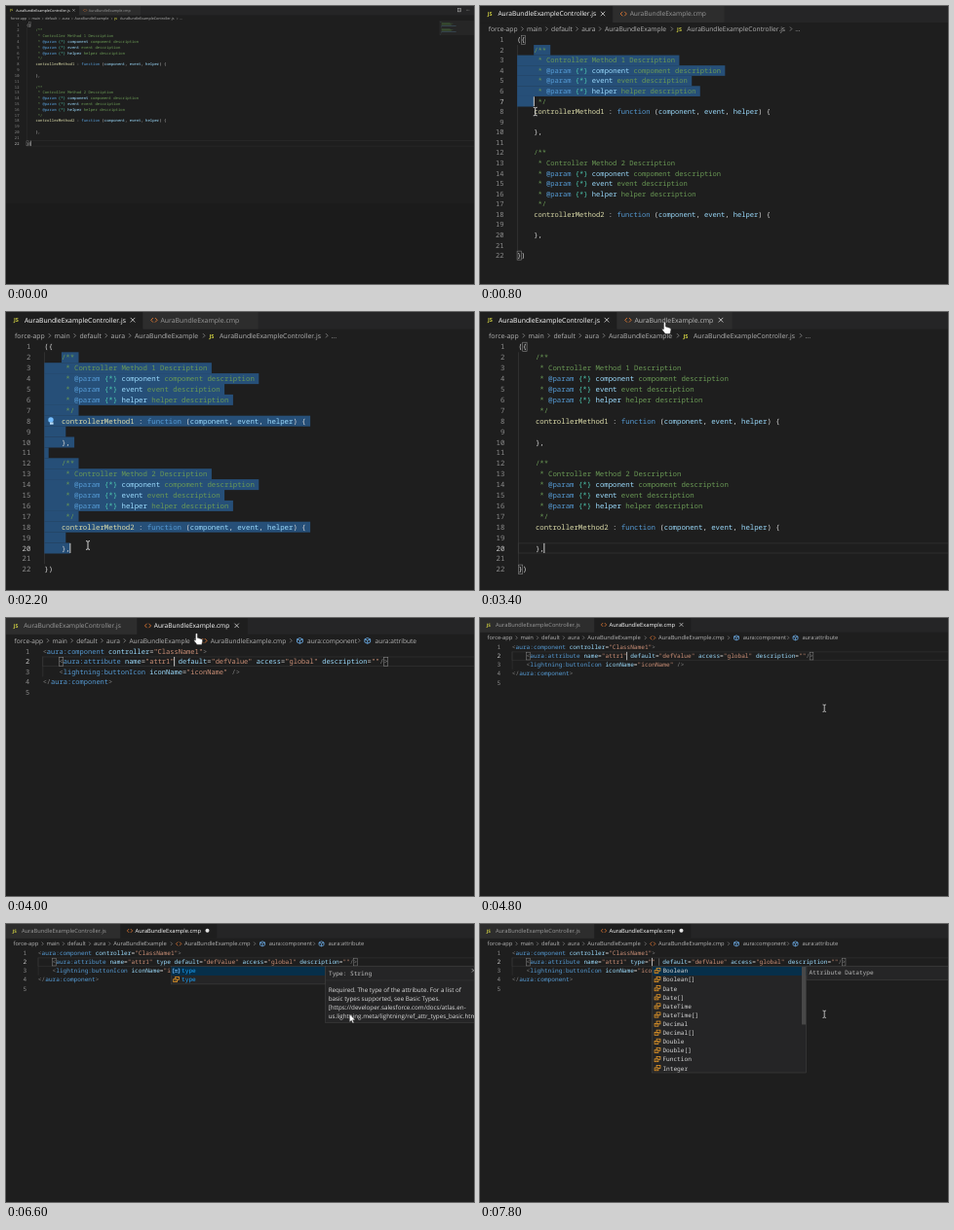
These frames come from a looping animation (480x286 px, 8 s). An HTML page:

```html
<!DOCTYPE html>
<html lang="en">
<head>
<meta charset="utf-8">
<title>Editor snippets</title>
<style>
html, body { margin: 0; width: 100%; height: 100%; overflow: hidden; background: #1e1e1e; }
svg { display: block; width: 100%; height: 100%; }
text { white-space: pre; text-rendering: geometricPrecision; font-weight: 500; }
.code { font-family: "Noto Sans Mono", "DejaVu Sans Mono", monospace; font-size: 7.333px; }
.ui, .doc { font-family: "Open Sans", "Noto Sans", sans-serif; font-size: 6.87px; }
.doc { font-size: 7.5px; }
</style>
</head>
<body>
<svg id="stage" viewBox="0 0 480 286"><g id="world"></g></svg>
<script>
const LOOP = 8000, STEP = 200;
const CH = 4.4, ROW = 10.9, LEFT = 39.3, TOP = 30.4;
const C = {
  text: '#d4d4d4', dim: '#8c8c8c', comment: '#6a9955', blue: '#569cd6', teal: '#4ec9b0',
  light: '#9cdcfe', fn: '#dcdcaa', str: '#ce9178', js: '#cbcb41', cmp: '#e37933',
  item: '#75beff', value: '#ee9d28', hit: '#18a3ff', crumb: '#b4b4b4'
};

const method = n => [
  '    /**',
  `     * Controller Method ${n} Description`,
  '     * @param {*} component compoment description',
  '     * @param {*} event event description',
  '     * @param {*} helper helper description',
  '     */',
  `    controllerMethod${n} : function (component, event, helper) {`,
  '    ',
  '    },'
];
const jsLines = ['({', ...method(1), '', ...method(2), '', '})'];
const head = '    <aura:attribute name="attr1"';
const tail = ' default="defValue" access="global" description=""/>';
const types = ['Boolean', 'Boolean[]', 'Date', 'Date[]', 'DateTime', 'DateTime[]',
  'Decimal', 'Decimal[]', 'Double', 'Double[]', 'Function', 'Integer'];

// Times with values; the last one reached holds.
const selection = [[600, [4, 4]], [800, [7, 4]], [1000, [8, 4]], [1400, [9, 4]],
  [1600, [12, 7]], [1800, [16, 20]], [2000, [20, 6]], [2600, null]];
const typing = [[0, ''], [5000, ' '], [5600, ' t'], [5800, ' ty'], [6000, ' typ'],
  [6200, ' type'], [6800, ' type="" ']];
const mousePath = [[400, 120, 60], [600, 62, 58], [800, 58.5, 112], [1400, 60, 114],
  [2000, 84, 240], [2600, 84, 240], [3400, 190, 11], [3800, 190, 11], [4600, 422.5, 111]];

const X = col => LEFT + col * CH;
const Y = line => TOP + (line - 1) * ROW;
const held = (keys, t) => keys.reduce((v, k) => t >= k[0] ? k[1] : v, null);
const clamp = v => Math.max(0, Math.min(1, v));
const ease = p => p < .5 ? 4 * p ** 3 : 1 - (2 - 2 * p) ** 3 / 2;
const ramp = (t, a, b) => ease(clamp((t - a) / (b - a)));
const esc = s => s.replace(/&/g, '&amp;').replace(/</g, '&lt;').replace(/>/g, '&gt;');

const rect = (x, y, w, h, fill, more = '') =>
  `<rect x="${x}" y="${y}" width="${w}" height="${h}" fill="${fill}" ${more}/>`;
const path = (d, stroke, w = .6, fill = 'none') =>
  `<path d="${d}" stroke="${stroke}" stroke-width="${w}" fill="${fill}"/>`;
const text = (cls, x, y, body, fill, more = '') =>
  `<text class="${cls}" x="${x}" y="${y}" fill="${fill}" ${more}>${body}</text>`;
const ui = (x, y, s, fill) => text('ui', x, y, esc(s), fill);
const code = (x, y, s, fill) => text('code', x, y, esc(s), fill);
const close = x => path(`M${x - 2.3} 5.9l4.6 4.6m0-4.6l-4.6 4.6`, '#ddd', .8);
const outline = (line, col) =>
  rect(X(col), Y(line) + .8, CH, ROW - 1.6, 'none', 'stroke="#888" stroke-width=".6"');

function paint(s, rx, colors, base) {
  const span = (part, fill) => part && `<tspan fill="${fill}">${esc(part)}</tspan>`;
  let out = '', i = 0;
  for (const m of s.matchAll(rx)) {
    const k = m.findIndex((g, j) => j && g !== undefined);
    out += span(s.slice(i, m.index), base) + span(m[0], colors[k - 1]);
    i = m.index + m[0].length;
  }
  return out + span(s.slice(i), base);
}
const paintJs = s => /^ +(\/?\*)/.test(s)
  ? paint(s, /(@param)|(\{\*\})|((?<=\} )\w+)/g, [C.blue, C.teal, C.light], C.comment)
  : paint(s, /(\/\*\*)|(controllerMethod\d)|(function)|(component|event|helper)/g,
    [C.comment, C.fn, C.blue, C.light], C.text);
const paintXml = s => paint(s, /(<\/?|\/?>)|([a-z]+:\w+)|("[^"]*")|(\w+)/g,
  ['#808080', C.blue, C.str, C.light], C.text);

const jsIcon = (x, y) => text('ui', x, y, 'JS', C.js, 'style="font-size:5.6px;font-weight:700"');
const cmpIcon = (x, y) => path(`M${x + 2.4} ${y - 2.3}l-2.2 2.3l2.2 2.3m2-4.6l2.2 2.3l-2.2 2.3`, C.cmp, .9);
const cube = (x, y) => path(`M${x} ${y - 3}l3 1.4v3.2l-3 1.4l-3-1.4v-3.2zm-3 1.4l3 1.4l3-1.4m-3 1.4v3.2`, C.item, .8);
const chevron = x => path(`M${x - 1} 22.2l2 2.1l-2 2.1`, '#999', .7);

function tabs(second, hover, dirty) {
  const on = '#fff', off = '#9a9a9a', bg = '#2d2d2d', active = '#1e1e1e';
  let s = rect(0, 0, 900, 17.6, '#252526')
    + rect(0, 0, 140, 17.6, second ? bg : active) + rect(140.6, 0, 118, 17.6, second ? active : bg)
    + jsIcon(8, 10.3) + ui(19, 10.6, 'AuraBundleExampleController.js', second ? off : on)
    + cmpIcon(148.5, 8.3) + ui(158.5, 10.6, 'AuraBundleExample.cmp', second ? on : hover ? '#bbb' : off);
  if (!second) s += close(130);
  if (dirty) s += '<circle cx="247" cy="8.2" r="2.4" fill="#e4e4e4"/>';
  else if (second || hover) s += close(247);
  return s + rect(868, 5, 6, 6, 'none', 'stroke="#bbb" stroke-width=".9"')
    + path('M871 5v6', '#bbb', .8) + path('M884 8h.9m1.6 0h.9m1.6 0h.9', '#bbb', 1.2);
}

function crumbs(second) {
  const y = 26.7;
  const names = [['force-app', 9], ['main', 49.5], ['default', 75.4], ['aura', 107.6], ['AuraBundleExample', 132]];
  const s = names.map(([n, x]) => ui(x, y, n, C.crumb)).join('')
    + [44.8, 70.5, 102.7, 127, 203].map(chevron).join('');
  return s + (second
    ? cmpIcon(208.5, 24.4) + ui(219, y, 'AuraBundleExample.cmp', C.crumb) + chevron(305)
      + cube(314.6, 24.4) + ui(322.6, y, 'aura:component', C.crumb) + chevron(378)
      + cube(387, 24.4) + ui(395.2, y, 'aura:attribute', C.crumb)
    : jsIcon(208.5, 26.5) + ui(219, y, 'AuraBundleExampleController.js', C.crumb)
      + chevron(329) + ui(333.5, y, '...', C.crumb));
}

function page(lines, painter, current) {
  return lines.map((s, i) =>
    text('code', 25.4, Y(i + 1) + 8, i + 1, i + 1 === current ? '#c6c6c6' : C.dim, 'text-anchor="end"')
    + text('code', LEFT, Y(i + 1) + 8, painter(s), C.text)).join('');
}

const highlight = line => rect(LEFT, Y(line) + .4, 870, ROW - .8, 'none', 'stroke="#2f2f2f" stroke-width=".9"');
const caret = (line, col) => rect(X(col) - .3, Y(line) + .4, .9, ROW - .8, '#e0e0e0');
const guide = (from, to) => rect(LEFT, Y(from), .5, (to - from + 1) * ROW, '#404040');

function selected([line, col]) {
  let s = '';
  for (let k = 2; k <= line; k++) {
    const a = k === 2 ? 4 : 0, b = k === line ? col : jsLines[k - 1].length + 1;
    s += rect(X(a), Y(k), (b - a) * CH, ROW + .1, '#264f78');
  }
  return s;
}

function minimap() {
  return rect(832, 28, 68, 28, '#262626') + jsLines.map((s, i) => {
    const indent = s.search(/\S/);
    return indent < 0 ? '' : rect(834 + indent * .5, 30 + i * 1.15, (s.length - indent) * .5, .7,
      s.includes('*') ? '#46693a' : '#50758d');
  }).join('');
}

function controller(t) {
  const sel = held(selection, t);
  const [line, col] = sel || (t < 600 ? [22, 2] : [20, 6]);
  const matched = t < 1200 || !sel;
  return (sel ? '' : highlight(line)) + guide(2, 21) + (sel ? selected(sel) : '')
    + page(jsLines, paintJs, line)
    + (matched ? outline(1, 1) + outline(22, 0) : '')
    + (sel && t >= 1200 ? '<circle cx="46" cy="111" r="2.7" fill="#75beff"/>' + rect(45, 113.5, 3.6, 2.2, '#b8dcf5') : '')
    + caret(line, col) + minimap();
}

const valueIcon = (x, y) => rect(x - 1, y - 3.4, 4.6, 3.4, 'none', `stroke="${C.value}" stroke-width=".9"`)
  + rect(x - 3.4, y - .6, 4.6, 3.4, '#252526', `stroke="${C.value}" stroke-width=".9"`)
  + path(`M${x - 2} ${y + 1.1}h2`, C.value, .7);
const attrIcon = (x, y) => path(`M${x - 2.4} ${y - 2.6}h-1.4v5.2h1.4m4.8-5.2h1.4v5.2h-1.4m-4.2-1.4h3.6m-3.6-2h3.6`, C.item, .9);

function popup(x, items, icon, fill) {
  const y = Y(3), edge = 'stroke="#454545" stroke-width=".6"';
  return rect(x, y, 189, items.length * ROW, '#252526', edge) + rect(x + .3, y + .3, 188.4, ROW, '#062f4a')
    + items.map((s, i) => icon(i)(x + 6.4, y + ROW * (i + .5)) + code(x + 13, y + ROW * i + 8, s, fill)).join('');
}
const panel = (x, h) => rect(x, Y(3), 240, h, '#252526', 'stroke="#454545" stroke-width=".6"');

function attrDoc(x) {
  const y = Y(3), lines = ['Required. The type of the attribute. For a list of',
    'basic types supported, see Basic Types.',
    '[https://developer.salesforce.com/docs/atlas.en-',
    'us.lightning.meta/lightning/ref_attr_types_basic.htm]'];
  return panel(x, 69) + code(x + 4, y + 10.8, 'Type: String', '#c4c4c4')
    + path(`M${x} ${y + 17}h240`, '#3a3a3a', .5)
    + lines.map((s, i) => text('doc', x + 3.6, y + 31.2 + i * ROW, s, '#dcdcdc')).join('')
    + path(`M${x + 179.5} ${y + 2.8}l4.4 4.4m0-4.4l-4.4 4.4`, '#ccc', .7);
}

function component(t) {
  const typed = held(typing, t), done = t >= 6800, open = t >= 5600 && !done;
  const col = head.length + typed.length - (done ? 2 : 0), line2 = head + typed + tail;
  const lines = ['<aura:component controller="ClassName1">', line2,
    '    <lightning:buttonIcon iconName="iconName" />', '</aura:component>', ''];
  let s = highlight(2) + guide(2, 3) + page(lines, paintXml, 2)
    + outline(2, 4) + outline(2, line2.length - 1);
  const x = X(col) + .3;
  if (t < 6400 || done) s += caret(2, col);
  if (done) s += rect(X(col + 2) - .3, Y(2) + 1, .8, ROW - 2, '#777');
  if (open) {
    s += popup(x, ['type', 'type'], i => i ? valueIcon : attrIcon, C.hit);
    if (t >= 5800) s += attrDoc(x + 189.5);
  }
  if (t >= 7400) {
    s += popup(x, types, () => valueIcon, C.text) + rect(x + 183.5, Y(3) + .5, 5, 71, '#484848');
    if (t >= 7600) s += panel(x + 189.5, 16.5) + code(x + 192.5, Y(3) + 10.6, 'Attribute Datatype', '#b8b8b8');
  }
  return s;
}

function mouse(t) {
  if (t < mousePath[0][0]) return '';
  const i = mousePath.findLastIndex(k => t >= k[0]);
  const a = mousePath[i], b = mousePath[i + 1] || a;
  const p = a === b ? 0 : ease((t - a[0]) / (b[0] - a[0]));
  const x = a[1] + (b[1] - a[1]) * p, y = a[2] + (b[2] - a[2]) * p;
  const put = d => `<g transform="translate(${x} ${y})">${d}</g>`;
  if (y < 18) return put(path('M-1.6 0q1.2-1.6 2 0v4l4.6 1.4q1.2.4.9 2l-.9 4.1h-5l-3.3-4.4q-.2-1.5 1.7-.4z', '#222', .5, '#fff'));
  if (t >= 5800 && t < 6800) return put(path('M-1 0v9.6l2.3-2l1.6 3.4l1.5-.7l-1.6-3.3h3z', '#222', .4, '#fff'));
  return put(path('M-2-4.4q2 0 2 1v6.8q0 1-2 1m4-8.8q-2 0-2 1m0 6.8q0 1 2 1', '#e6e6e6', .9));
}

function render(t) {
  const second = t >= 3600;
  const zoom = .534 + .466 * ramp(t, 170, 1015) - .164 * ramp(t, 3600, 4600);
  const hover = t >= 3400 && !second;
  const world = document.getElementById('world');
  world.setAttribute('transform', `scale(${zoom})`);
  world.innerHTML = rect(0, 0, 900, 540, '#1e1e1e') + rect(0, 381, 900, 160, '#1b1b1b')
    + tabs(second, hover, t >= 5000) + crumbs(second)
    + (second ? component(t) : controller(t)) + mouse(t);
}

let shown = -1;
const start = performance.now();
function tick() {
  const t = Math.floor((performance.now() - start) % LOOP / STEP) * STEP;
  if (t !== shown) render(shown = t);
  requestAnimationFrame(tick);
}
tick();
</script>
</body>
</html>
```
